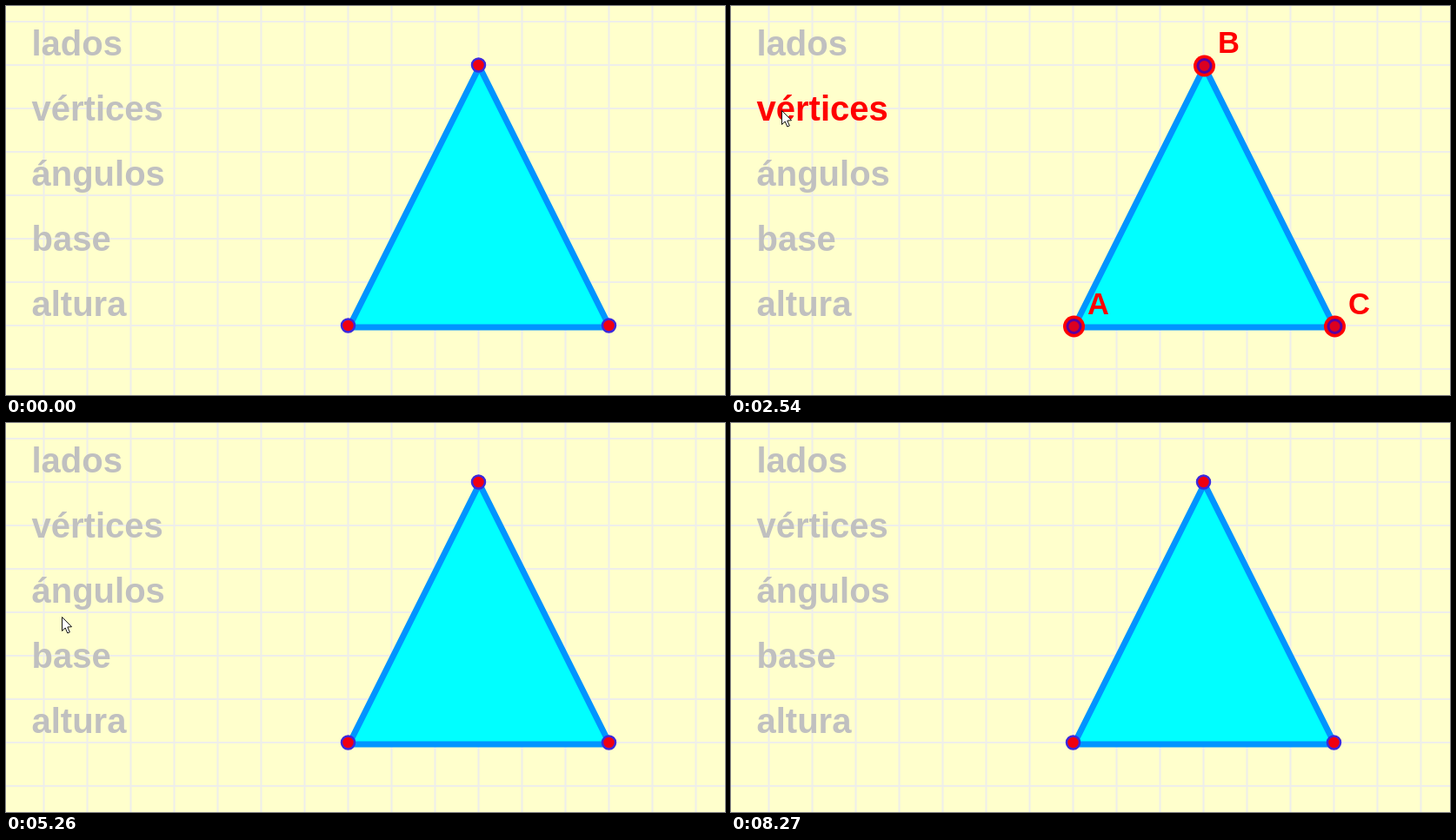
An HTML page with a canvas that plays this animation: 827 by 448 pixels, repeating every 9430 ms.

```html
<!DOCTYPE html>
<html lang="es">
<head>
<meta charset="utf-8">
<title>Elementos del triángulo</title>
<style>
  html, body { margin: 0; width: 100%; height: 100%; overflow: hidden; background: #ffffcc; }
  canvas { display: block; }
</style>
</head>
<body>
<canvas id="stage" width="827" height="448"></canvas>
<script>
const ctx = document.getElementById('stage').getContext('2d');
const LOOP = 9430;
const SIDE = '#0094ff';
const A = [393, 368], B = [543, 68], C = [693, 368];
const MENU = [
  ['lados', '#009fff'],
  ['vértices', '#ff0000'],
  ['ángulos', '#006400'],
  ['base', '#0000ff'],
  ['altura', '#ff00ff'],
];

// Each pointer move: start, end, number of steps, destination
const START = [-25, 34];
const MOVES = [
  [970, 1140, 3, [50, 28]],
  [1990, 2540, 8, [58, 120]],
  [3620, 4160, 8, [62, 193]],
  [5090, 5640, 8, [67, 272]],
  [6880, 7200, 5, [82, 337]],
  [8040, 8270, 4, [86, 397]],
];

function pointerAt(t) {
  if (t < MOVES[0][0] || t >= MOVES.at(-1)[1]) return null;
  let from = START;
  let pos = START;
  for (const [begin, end, steps, to] of MOVES) {
    if (t < begin) break;
    const gap = (end - begin) / (steps - 1);
    const step = Math.min(steps, Math.floor((t - begin) / gap + 0.02) + 1);
    pos = from.map((v, i) => Math.round(v + (to[i] - v) * step / steps));
    from = to;
  }
  return pos;
}

function hovered(p) {
  if (!p || p[0] < 28) return '';
  const i = MENU.findIndex((_, n) => Math.abs(p[1] - 43 - 75 * n) < 25);
  return i < 0 ? '' : MENU[i][0];
}

function path(points, close) {
  ctx.beginPath();
  points.forEach(p => ctx.lineTo(...p));
  if (close) ctx.closePath();
}

function line(points, color, width, close) {
  path(points, close);
  ctx.strokeStyle = color;
  ctx.lineWidth = width;
  ctx.stroke();
}

function disc([x, y], r, fill, stroke, width) {
  ctx.beginPath();
  ctx.arc(x, y, r, 0, 2 * Math.PI);
  ctx.fillStyle = fill;
  ctx.fill();
  if (!stroke) return;
  ctx.strokeStyle = stroke;
  ctx.lineWidth = width;
  ctx.stroke();
}

function label(text, x, y, color, size = 34.5) {
  ctx.font = `bold ${size}px "Liberation Sans", Arial, sans-serif`;
  ctx.fillStyle = color;
  ctx.fillText(text, x, y);
}

function drawGrid() {
  ctx.fillStyle = '#ffffcc';
  ctx.fillRect(0, 0, 827, 448);
  ctx.fillStyle = '#eeeeea';
  for (let x = 42.5; x < 827; x += 50) ctx.fillRect(x, 0, 2, 448);
  for (let y = 17; y < 448; y += 50) ctx.fillRect(0, y, 827, 2);
}

function drawTriangle(mode) {
  const thick = mode === 'lados';
  const shift = ([x, y]) => thick ? [x + 0.5, y + 1] : [x + 1.5, y + 2];
  const corners = [A, B, C].map(shift);
  path(corners, true);
  ctx.fillStyle = '#00ffff';
  ctx.fill();
  ctx.lineJoin = 'round';
  line(corners, SIDE, thick ? 10 : 7, true);
}

function drawAngle([x, y], from, to, color) {
  ctx.beginPath();
  ctx.moveTo(x, y);
  ctx.arc(x, y, 48, from, to);
  ctx.closePath();
  ctx.globalAlpha = 0.15;
  ctx.fillStyle = color;
  ctx.fill();
  ctx.globalAlpha = 1;
  ctx.strokeStyle = color;
  ctx.lineWidth = 4;
  ctx.stroke();
}

function drawVertices(mode) {
  for (const [x, y] of [A, B, C]) {
    if (mode === 'vértices') {
      disc([x + 1.5, y + 1], 12.5, '#ff0000');
      disc([x + 1.5, y + 1], 7.5, '#dc0020', '#5a00a0', 3);
    } else {
      disc([x + 0.5, y], 7.5, '#f00010', '#3c28dc', 2.5);
    }
  }
}

const details = {
  lados() {
    label('c', 432, 217, SIDE, 39);
    label('a', 632, 217, SIDE, 39);
    label('b', 546, 411, SIDE, 39);
  },
  'vértices'(color) {
    label('A', 410, 355, color);
    label('B', 560, 54, color);
    label('C', 710, 355, color);
  },
  'ángulos'(color) {
    const slope = Math.atan(2);
    drawAngle(A, -slope, 0, color);
    drawAngle(B, slope, Math.PI - slope, color);
    drawAngle(C, Math.PI, Math.PI + slope, color);
    label('α', 409, 363, color);
    label('β', 560, 63, color);
    label('γ', 709, 363, color);
  },
  base(color) {
    line([[393, 369], [693, 369]], color, 10);
    label('base', 569.5, 419.5, color);
  },
  altura(color) {
    line([[544, 71], [544, 368]], color, 7);
    label('altura', 515, 232, color);
  },
};

function drawPointer([x, y]) {
  ctx.save();
  ctx.translate(x + 0.5, y + 0.5);
  ctx.lineJoin = 'miter';
  path([[0, 0], [0, 16], [3.7, 12.5], [6.3, 18.5], [8.8, 17.4], [6.3, 11.5], [11, 11.2]], true);
  ctx.fillStyle = '#fff';
  ctx.fill();
  ctx.strokeStyle = '#111';
  ctx.lineWidth = 1;
  ctx.stroke();
  ctx.restore();
}

function draw(t) {
  const pointer = pointerAt(t);
  const mode = hovered(pointer);
  drawGrid();
  // The figure is slightly soft; the pointer stays crisp
  ctx.filter = 'blur(0.7px)';
  drawTriangle(mode);
  MENU.forEach(([word, color], i) => {
    label(word, 29.5, 57 + 75 * i, word === mode ? color : '#c0c0c0', 40);
    if (word === mode) details[word](color);
  });
  drawVertices(mode);
  ctx.filter = 'none';
  if (pointer) drawPointer(pointer);
}

const origin = performance.now();
function tick() {
  draw((performance.now() - origin) % LOOP);
  requestAnimationFrame(tick);
}
tick();
</script>
</body>
</html>
```
